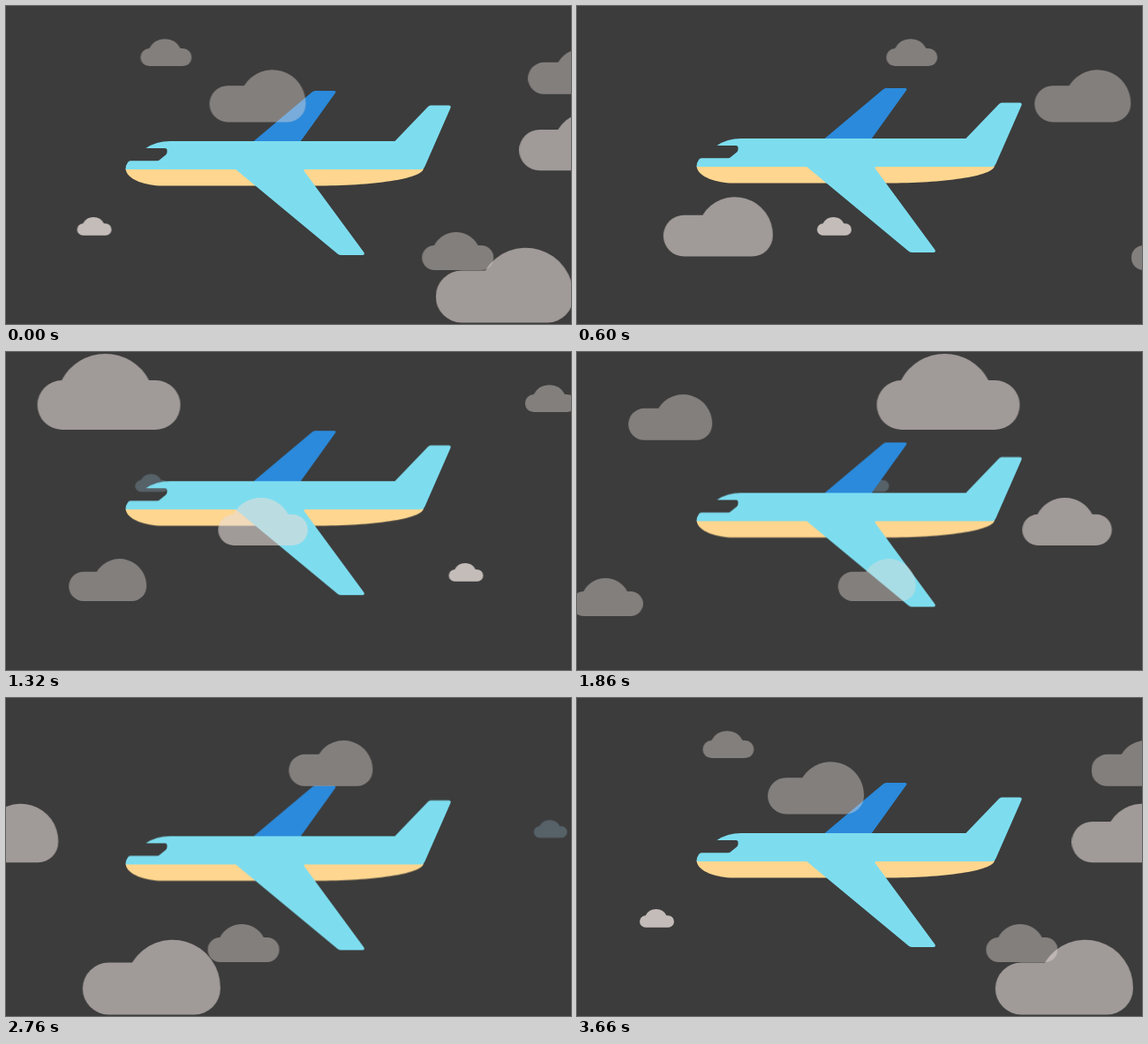
An HTML page for the animation above (3.69 s loop, 640 by 360 pixels).

```html
<!DOCTYPE html>
<html lang="en">
<head>
<meta charset="utf-8">
<title>Plane in the clouds</title>
<style>
  html, body { margin: 0; width: 100%; height: 100%; overflow: hidden; background: #3c3c3c; }
  svg { display: block; width: 100vw; height: 100vh; }
  .cloud { fill: #e7ddd9; animation: drift 3690ms linear infinite; }
  .plane { animation: bob 3690ms linear infinite; }
  .sky { fill: #7dddef; }
  @keyframes drift {
    from { transform: translateX(var(--from)); }
    to { transform: translateX(var(--to)); }
  }
  @keyframes bob {
    0% { transform: translateY(0); }
    16.3% { transform: translateY(-3px); }
    35.8% { transform: translateY(-6.8px); }
    38% { transform: translateY(-7.1px); animation-timing-function: ease-in-out; }
    49% { transform: translateY(6.7px); }
    65% { transform: translateY(4px); }
    84.6% { transform: translateY(2.8px); }
    99.2%, 100% { transform: translateY(0); }
  }
</style>
</head>
<body>
<svg viewBox="0 0 640 360">
  <defs>
    <path id="dome" d="M28 30H27.5A55.8 55.8 0 0 1 126.5 30H134a28 28 0 0 1 0 56H28a28 28 0 0 1 0-56z"/>
    <path id="side" d="M29.5 26H56A54 54 0 0 1 156 55.5A29.5 29.5 0 0 1 126.5 85H29.5a29.5 29.5 0 0 1 0-59z"/>
  </defs>
  <g id="back"></g>
  <g class="plane">
    <path fill="#2b8adb" d="M280 153.5L346 98Q348.500 96 350 96H371.500Q374.500 96 373 98.500L333.500 153.500z"/>
    <path fill="#ffd68f" d="M135.500 184C136 197 160 203.500 176 203.500H350C415 203.500 471 196 473 184z"/>
    <path class="sky" d="M158.500 161Q170 153 186 153H440.500L478 114Q479.500 112.500 481 112.500H501.500Q504.500 112.500 503.500 115.500L474.500 181.500Q473 185 470 185H135.500Q135 181 138 177Q139 175.300 141 175.300H171Q173 175.300 174.500 173.800L181 168.500Q182.500 167 182.500 165V163.500Q182.500 161 180 161z"/>
    <path class="sky" d="M259 184L375.500 280.500Q377.500 282 380 282H403.500Q407 282 405.500 279L338.500 188Q336.500 185 339.500 184z"/>
  </g>
  <g id="front"></g>
</svg>
<script>
  const LOOP = 3690;
  const NS = 'http://www.w3.org/2000/svg';
  const WIDTH = { dome: 162, side: 156 };

  function make(name, attrs, parent) {
    const el = document.createElementNS(NS, name);
    for (const key in attrs) el.setAttribute(key, attrs[key]);
    return parent.appendChild(el);
  }

  // x: place at time zero; dist: way covered in one loop
  function cloud(layer, shape, x, y, w, dist, opacity, fill) {
    const from = -w - 5;
    const phase = (((x - from) % dist + dist) % dist) / dist;
    const g = make('g', { class: 'cloud', opacity }, document.getElementById(layer));
    g.style.setProperty('--from', from + 'px');
    g.style.setProperty('--to', from + dist + 'px');
    g.style.animationDelay = -phase * LOOP + 'ms';
    if (fill) g.style.fill = fill;
    make('use', {
      href: '#' + shape,
      transform: `translate(0 ${y}) scale(${w / WIDTH[shape]})`
    }, g);
  }

  const FAR = 0.415, NEAR = 0.585;
  cloud('back', 'dome', -268, 138, 38, 1157, 1, '#566168');
  cloud('back', 'dome', 471, 256, 81, 963, FAR);
  cloud('front', 'dome', 152, 37.3, 58, 1217.5, FAR);
  cloud('front', 'side', 230, 72, 109, 1770, FAR);
  cloud('front', 'side', 591, 48, 95, 1075, FAR);
  cloud('front', 'side', -478, 234, 88, 1534, FAR);
  cloud('front', 'dome', 80.2, 239, 39, 1177, 0.8);
  cloud('front', 'dome', -405.5, 165, 101.5, 1804, NEAR);
  cloud('front', 'side', 580.5, 119.5, 122.5, 2557, NEAR);
  cloud('front', 'side', -383, 216, 124, 2952, NEAR);
  cloud('front', 'side', 486.3, 273.500, 156, 1587, NEAR);
  cloud('front', 'dome', -708, 2, 162, 2077, NEAR);
</script>
</body>
</html>
```
